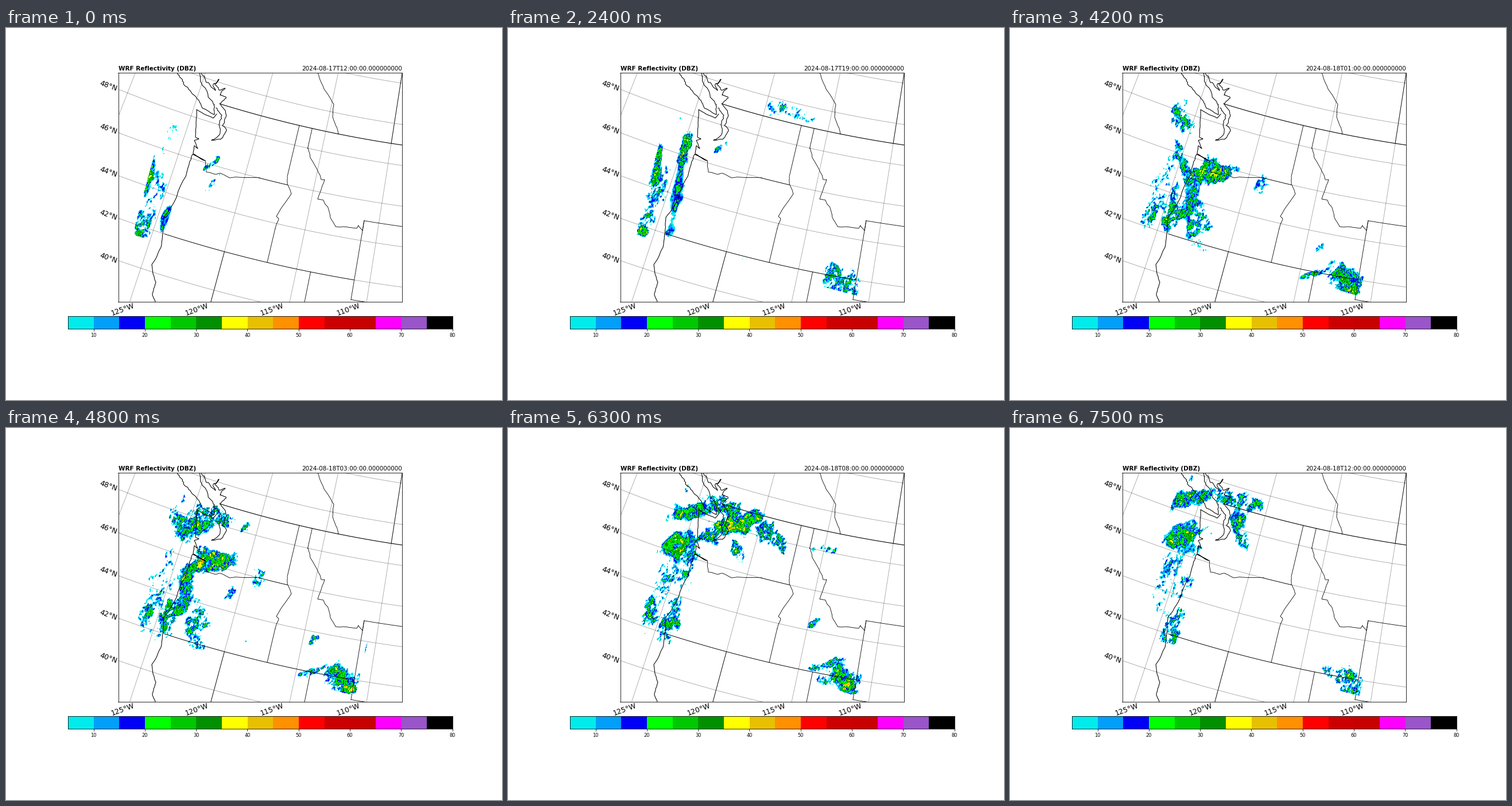
Animation of 864x648 px, one loop 7800 ms. Source, as a matplotlib script:

```python
import numpy as np
import matplotlib.pyplot as plt
from matplotlib.animation import FuncAnimation
from matplotlib.colors import BoundaryNorm, ListedColormap

W, H = 864, 648
LEFT, RIGHT, TOP, BOTTOM = 195.5, 690.1, 77.76, 476.93
COLORS = ["#00ecec", "#019ff9", "#0000f6", "#00ff00", "#00c800", "#009000",
          "#ffff00", "#e7c000", "#ff9000", "#ff0000", "#cc0000", "#c80000",
          "#ff00ff", "#9955c9", "#000000"]
CMAP = ListedColormap(COLORS)
NORM = BoundaryNorm(np.arange(5, 81, 5), 15)

rng = np.random.default_rng(17)
fig = plt.figure(figsize=(W / 72, H / 72), dpi=72, facecolor="white")


def pixel_axes(x0, x1, y0, y1):
    return fig.add_axes([x0 / W, 1 - y1 / H, (x1 - x0) / W, (y1 - y0) / H])


def label(x, y, s, size, **kw):
    return fig.text(x / W, 1 - y / H, s, fontsize=size,
                    family="DejaVu Sans", **kw)


# --- map -----------------------------------------------------------------
ax = pixel_axes(LEFT, RIGHT, TOP, BOTTOM)
for spine in ax.spines.values():
    spine.set(linewidth=0.83, zorder=9)


def iso(lat):
    return np.tan(np.pi / 4 + np.radians(lat) / 2)


CONE = np.log(np.cos(np.radians(33)) / np.cos(np.radians(45))) \
    / np.log(iso(45) / iso(33))


def project(lon, lat):
    """Lambert conformal conic (33N, 45N, 96W) in stage pixels."""
    rho = np.cos(np.radians(33)) * iso(33) ** CONE / CONE / iso(lat) ** CONE
    th = CONE * np.radians(lon + 96)
    return 994.2 + 2003 * rho * np.sin(th), -1880 + 2003 * rho * np.cos(th)


def draw(x, y, style="-", lw=0.83):
    ax.plot(x, y, style, color="black", lw=lw, zorder=5)


def parallel(lat, west=-137, east=-103, **kw):
    draw(*project(np.linspace(west, east, 60), lat), **kw)


def meridian(lon, south=36, north=56, **kw):
    draw(*project(lon, np.linspace(south, north, 60)), **kw)


def rugged(points, rough=0.06, lw=0.83, steps=6):
    """Line through key points, roughened by a seeded random bridge."""
    pts = np.array(points, float)
    t = np.linspace(0, 1, steps + 1)[:, None]
    out = []
    for a, b in zip(pts, pts[1:]):
        walk = rng.normal(size=(steps + 1, 2)).cumsum(0)
        walk -= walk[0] + (walk[-1] - walk[0]) * t
        out.append(a + (b - a) * t + walk * rough * np.hypot(*(b - a)) ** 0.6)
    draw(*np.vstack(out).T, lw=lw)


for lat in range(38, 57, 2):
    parallel(lat, style=":", lw=0.8)
for lon in range(-135, -104, 5):
    meridian(lon, style=":", lw=0.8)

parallel(49, -123.25, lw=1.1)
parallel(46, -118.98, -116.92)
parallel(42, -124.2, -111.05)
parallel(45, -111.05)
parallel(41, -111.05)
meridian(-110, 49)
meridian(-117.04, 46.42, 49)
meridian(-116.05, 47.98, 49)
meridian(-117.03, 42, 43.75)
meridian(-120, 38, 42)
meridian(-114.04, 38, 42)
meridian(-111.05, 41, 45)

# Rivers and ridges
rugged([(526, 209), (530, 226), (549, 264), (555, 264), (543, 298),
        (553, 300), (561, 313), (565, 330), (574, 346), (611, 349),
        (614, 344), (621, 353), (624, 336)])
rugged([(490, 259), (490, 272), (497, 289), (478, 316), (471, 328),
        (475, 332), (469, 349)])
rugged([(543, 78), (547, 90), (564, 121), (571, 133), (569, 155), (579, 185)])
rugged([(347, 231), (349, 251), (365, 255), (374, 253), (390, 261),
        (442, 261)])

# Pacific coast, island, inner coast and sound
rugged([(260, 477), (255, 463), (261, 443), (254, 412), (270, 382),
        (274, 350), (275, 330), (292, 305), (316, 247), (325, 220),
        (347, 231), (326, 219), (328, 205), (334, 210), (328, 196),
        (336, 193), (330, 190), (331, 165), (332, 142), (361, 157),
        (367, 150)], 0.08, 1.05)
rugged([(298, 78), (307, 92), (318, 107), (331, 120), (340, 135), (363, 151),
        (361, 132), (342, 100), (337, 78)], 0.2, 1.05)
rugged([(340, 78), (349, 95), (365, 109), (361, 98), (371, 89), (364, 99),
        (371, 108), (382, 105), (373, 117), (383, 120), (373, 132),
        (384, 152), (380, 172), (382, 182), (374, 194), (358, 196),
        (371, 187), (371, 168), (376, 152), (366, 139)], 0.2, 1.05)

for i in range(5):
    label(178.5, 101 + 75 * i, f"{48 - 2 * i}°N", 12.5, rotation=-20,
          ha="center", va="center")
for lon in range(125, 109, -5):
    label(project(-lon, 39.1)[0] - 21.5, 490.8, f"{lon}°W", 12.5, rotation=20,
          ha="center", va="center")

label(LEFT, 73.5, "WRF Reflectivity (DBZ)", 10.42, weight="bold")
stamp = label(RIGHT, 73.5, "", 10.42, ha="right")

# --- colour bar ----------------------------------------------------------
bar = pixel_axes(108, 777.6, 501.88, 524.2)
bar.imshow(np.arange(7.5, 80, 5)[None], cmap=CMAP, norm=NORM, aspect="auto",
           extent=(5, 80, 0, 1), interpolation="nearest")
bar.set(xticks=range(10, 81, 10), yticks=[])
bar.tick_params(length=3.6, width=0.83, pad=3.6, labelsize=8.3)
for spine in bar.spines.values():
    spine.set_linewidth(0.83)

# --- radar echoes --------------------------------------------------------
X0, X1, Y0, Y1 = 216, 664, 78, 476
X, Y = np.meshgrid(np.arange(X0, X1) + 0.5, np.arange(Y0, Y1) + 0.5)
DOMAIN = ((X > 220 + (362 - Y) * 0.27) & (Y < 360 + (X - 220) * 0.275)
          & (X < 623 + (403 - Y) * 0.23))


def noise(along, across):
    """Unit noise, stretched along the SSW-NNE flow."""
    fy = np.fft.fftfreq(X.shape[0])[:, None]
    fx = np.fft.fftfreq(X.shape[1])[None]
    u, v = 0.45 * fx - 0.89 * fy, 0.89 * fx + 0.45 * fy
    gain = np.exp(-2 * np.pi ** 2 * ((along * u) ** 2 + (across * v) ** 2))
    f = np.fft.ifft2(np.fft.fft2(rng.normal(size=X.shape)) * gain).real
    return f / f.std()


def texture():
    return 1.7 * np.tanh((0.75 * noise(1.4, 0.9) + 0.66 * noise(4, 2.5)) / 1.7)


TEX_A, TEX_B, WARP = texture(), texture(), noise(8, 6)

# Mean strength in dBZ and raggedness of each kind of echo
WISP, SPARSE, MIXED = (2, 6), (3, 12), (14, 12)
DENSE, CORE, SMOOTH = (23, 9), (28, 11), (20, 5)
systems = []


def system(kind, t0, t1, start, end, size, tilt=15):
    """Ellipse drifting from start to end; tilt is clockwise from north."""
    systems.append((kind, t0, t1, np.array(start), np.array(end), size,
                    np.radians(tilt)))


# Offshore
system(WISP, 10, 19, (292, 176), (272, 187), (18, 17), 0)
system(DENSE, 9, 25, (247, 262), (266, 232), (42, 8), 10)
system(SPARSE, 9, 39, (254, 295), (272, 262), (64, 18))
system(MIXED, 9, 35, (235, 348), (250, 318), (32, 15))
system(CORE, 14, 25, (226, 355), (250, 348), (12, 10))
system(MIXED, 20, 38, (280, 312), (286, 352), (42, 17))
# Coast
system(SMOOTH, 10, 14, (273, 346), (280, 328), (24, 6), 17)
system(SMOOTH, 13.5, 21, (288, 308), (297, 278), (66, 8), 9)
system(DENSE, 14, 21, (301, 248), (311, 195), (30, 11), 12)
system(DENSE, 21, 25.5, (300, 250), (304, 240), (64, 8), -18)
system(MIXED, 21.5, 30, (288, 145), (316, 185), (30, 14), -25)
system(MIXED, 22, 25, (311, 183), (313, 180), (30, 7), -8)
system(DENSE, 24, 32, (316, 305), (304, 255), (46, 14), 10)
system(DENSE, 29, 39, (294, 218), (298, 178), (32, 25), 65)
system(SPARSE, 30, 39, (300, 258), (290, 262), (28, 25))
# Western valleys and the sound
system(SPARSE, 10, 19, (360, 268), (378, 246), (28, 10), 30)
system(MIXED, 10, 21, (350, 248), (374, 200), (20, 6), 55)
system(MIXED, 21, 31, (316, 338), (338, 350), (42, 18), 10)
system(CORE, 21.5, 34, (344, 298), (392, 148), (34, 20), 78)
system(DENSE, 31, 39, (388, 165), (400, 160), (28, 14), 10)
system(DENSE, 25, 39, (334, 185), (308, 108), (46, 15), 75)
system(MIXED, 25, 39, (350, 158), (396, 116), (42, 18), 105)
# Interior
system(SPARSE, 17, 25, (510, 150), (440, 128), (45, 14), 108)
system(SPARSE, 21, 31, (428, 295), (448, 240), (24, 13), 40)
system(MIXED, 25, 29, (388, 292), (392, 280), (16, 10), 40)
system(MIXED, 28, 36, (425, 200), (492, 180), (38, 17), 110)
system(DENSE, 29, 35, (405, 168), (428, 150), (28, 11), 85)
system(MIXED, 29, 37, (395, 225), (405, 190), (28, 11), -25)
system(SPARSE, 30.5, 34, (558, 210), (562, 212), (28, 11), 100)
# Southeast
system(MIXED, 17.5, 38, (576, 442), (596, 440), (38, 23), 115)
system(DENSE, 21, 34, (590, 436), (582, 432), (24, 18), 130)
system(CORE, 21, 35, (594, 460), (590, 448), (18, 10), 80)
system(MIXED, 22, 35, (518, 434), (566, 406), (30, 7), 75)
system(MIXED, 22, 34, (547, 398), (526, 330), (10, 6), 45)
system(SMOOTH, 25.8, 28.2, (628, 388), (630, 378), (16, 3.5), 14)


def echoes(hour):
    age = hour - 12
    tex = TEX_A * np.cos(age * 0.35) + TEX_B * np.sin(age * 0.35)
    tex = np.roll(tex, (-3 * age, age), (0, 1))
    warp = 1 + 0.2 * np.roll(WARP, (-4 * age, age), (0, 1))
    field = np.zeros(X.shape)
    for (dbz, rough), t0, t1, start, end, (length, width), tilt in systems:
        if not t0 < hour < t1:
            continue
        cx, cy = start + (end - start) * (hour - t0) / (t1 - t0)
        fade = 5 * max(0, 1.5 - min(hour - t0, t1 - hour))
        c, s = np.cos(tilt), np.sin(tilt)
        u = ((X - cx) * s - (Y - cy) * c) / length
        v = ((X - cx) * c + (Y - cy) * s) / width
        d = np.hypot(u, v) * warp
        field = np.maximum(field, dbz - fade - 18 * d ** 4 + rough * tex)
    return np.where(DOMAIN & (field >= 5), np.minimum(field, 54), np.nan)


radar = ax.imshow(np.full(X.shape, np.nan), cmap=CMAP, norm=NORM, zorder=2,
                  extent=(X0, X1, Y1, Y0), aspect="auto",
                  interpolation="nearest")
ax.set(xlim=(LEFT, RIGHT), ylim=(BOTTOM, TOP), xticks=[], yticks=[])


def update(i):
    hour = 12 + max(0, i - 1)  # the first hour is held twice as long
    radar.set_data(echoes(hour))
    stamp.set_text(f"2024-08-{17 + hour // 24}T{hour % 24:02d}"
                   ":00:00.000000000")
    return radar, stamp


anim = FuncAnimation(fig, update, frames=26, interval=300, repeat=True,
                     repeat_delay=0, blit=False)
plt.show()
```
